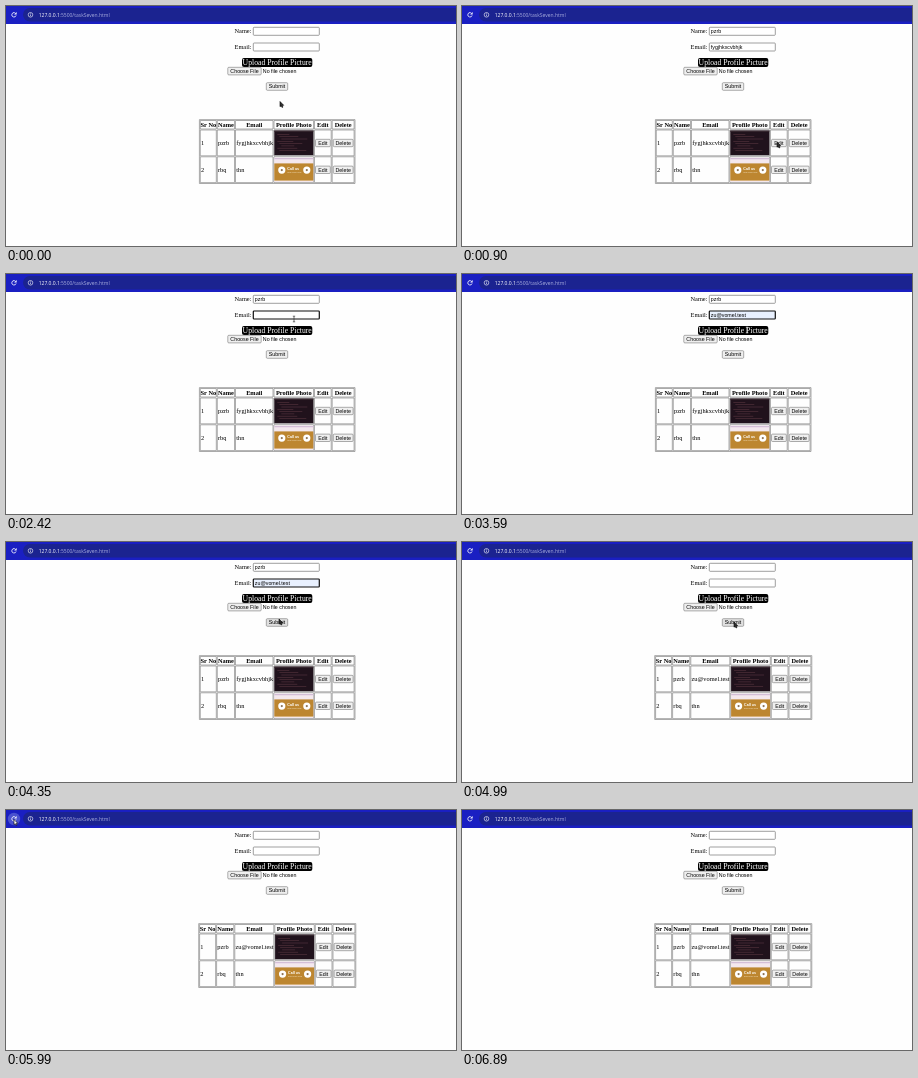
Write an HTML page with a canvas that moves like this. It is 450 px wide and 240 px high and loops after 6.95 s.

```html
<!DOCTYPE html>
<html lang="en">
<head>
<meta charset="utf-8">
<title>Profile table</title>
<style>
  html, body { margin: 0; width: 100%; height: 100%; overflow: hidden; background: #fefefe; }
  canvas { display: block; }
</style>
</head>
<body>
<canvas id="stage" width="450" height="240"></canvas>
<script>
const ctx = document.getElementById('stage').getContext('2d');
const LOOP = 6950;
const SERIF = '"Liberation Serif", serif';
const SANS = '"Liberation Sans", sans-serif';
const NAME = 'pzrb';
const OLD_MAIL = 'fygjhkxcvbhjk';
const NEW_MAIL = 'zu@vomel.test';

// Moments at which the page changes, in ms
const FILL = 900, FOCUS = 1850, SELECT = 2160, CLEAR = 2360, AUTOFILL = 3340, SUBMIT = 4990;

// Pointer path: time, x, y
const PATH = [
  [0, 274, 95.5], [260, 274, 95.5], [380, 285, 108], [580, 285, 108],
  [700, 315, 136], [960, 315, 136], [1330, 289, 48], [1600, 289, 48],
  [1660, 288, 45], [3340, 288, 45], [3590, 285, 56], [3710, 281, 62],
  [3910, 281, 62], [4090, 275, 72], [4290, 275, 72], [4350, 273, 77],
  [4610, 273, 77], [4730, 272, 80], [5250, 272, 80], [5930, 8, 9.5],
  [6110, 8, 9.5], [6410, 348, 118], [6650, 291, 130], [6710, 288, 130]
];

const between = (t, a, b) => t >= a && t < b;

function pointerAt(t) {
  const i = PATH.findIndex(p => p[0] > t);
  if (i < 0) return null;
  const [t0, x0, y0] = PATH[i - 1], [t1, x1, y1] = PATH[i];
  const k = (t - t0) / (t1 - t0), e = k * k * (3 - 2 * k);
  return { x: x0 + (x1 - x0) * e, y: y0 + (y1 - y0) * e };
}

function rect(x, y, w, h, fill) {
  ctx.fillStyle = fill;
  ctx.fillRect(x, y, w, h);
}

function box(x, y, w, h, r, fill, stroke, width = 0.7) {
  ctx.beginPath();
  ctx.roundRect(x, y, w, h, r);
  if (fill) { ctx.fillStyle = fill; ctx.fill(); }
  if (stroke) { ctx.strokeStyle = stroke; ctx.lineWidth = width; ctx.stroke(); }
}

function disc(x, y, r, fill) {
  ctx.beginPath();
  ctx.arc(x, y, r, 0, Math.PI * 2);
  ctx.fillStyle = fill;
  ctx.fill();
}

function text(str, x, y, font, color = '#000', align = 'left') {
  ctx.font = font;
  ctx.fillStyle = color;
  ctx.textAlign = align;
  ctx.fillText(str, x, y);
}

const serif = (str, x, y) => text(str, x, y, `6.35px ${SERIF}`);

function button(label, x, y, w, h, fill = '#efefef') {
  box(x, y, w, h, 1, fill, '#767676', 0.6);
  text(label, x + w / 2, y + h / 2 + 1.9, `5.3px ${SANS}`, '#000', 'center');
}

function input(y, value, { focused, filled, selected } = {}) {
  box(247.3, y, 66, 8, 0.8, filled ? '#e8f0fe' : '#fff',
    focused ? '#101010' : '#767676', focused ? 1.2 : 0.7);
  ctx.font = `5.3px ${SANS}`;
  if (selected) rect(248.8, y + 1, ctx.measureText(value).width, 6, '#1a73e8');
  text(value, 248.8, y + 5.9, `5.3px ${SANS}`, selected ? '#fff' : '#000');
}

function browserBar(t) {
  rect(0, 0, 450, 18, '#1a1fc2');
  box(17, 2, 440, 13.5, 6.7, '#1b2390');
  if (between(t, 5870, 6200)) disc(8, 9, 6.2, '#4a52cf');

  ctx.strokeStyle = '#fff';
  ctx.lineWidth = 0.8;
  ctx.beginPath();
  ctx.arc(8, 8.8, 2.2, 0.3, 5.3);
  ctx.stroke();
  ctx.beginPath();
  ctx.moveTo(10.6, 6);
  ctx.lineTo(10.6, 8.5);
  ctx.lineTo(8.1, 8.5);
  ctx.closePath();
  ctx.fillStyle = '#fff';
  ctx.fill();

  ctx.lineWidth = 0.6;
  ctx.beginPath();
  ctx.arc(24.5, 8.8, 2.3, 0, Math.PI * 2);
  ctx.stroke();
  rect(24.2, 8.4, 0.6, 1.7, '#fff');
  rect(24.2, 7.3, 0.6, 0.6, '#fff');

  const font = '5px "Open Sans", sans-serif';
  text('127.0.0.1', 32.7, 10.8, font, '#fff');
  text(':5500/taskSeven.html', 53.6, 10.8, font, '#a9aede');
}

function mailState(t) {
  if (t < FILL || t >= SUBMIT) return '';
  if (t < CLEAR) return OLD_MAIL;
  if (t >= AUTOFILL) return NEW_MAIL;
  return NEW_MAIL.slice(0, [2620, 2680, 3010].filter(k => t >= k).length);
}

function form(t) {
  serif('Name:', 228.5, 27);
  input(21.3, between(t, FILL, SUBMIT) ? NAME : '');
  serif('Email:', 228.5, 43);
  input(37, mailState(t), {
    focused: between(t, FOCUS, SUBMIT),
    filled: between(t, AUTOFILL, SUBMIT),
    selected: between(t, SELECT, CLEAR)
  });
  box(236, 52, 70.3, 9, 2, '#000');
  text('Upload Profile Picture', 271.2, 59.1, `7.7px ${SERIF}`, '#fff', 'center');
  button('Choose File', 221.8, 61.3, 33.4, 7.6);
  text('No file chosen', 256.8, 67, `5.3px ${SANS}`);
  button('Submit', 260.3, 76.7, 21.4, 7.6, between(t, 4350, 5310) ? '#e0e0e0' : '#efefef');
}

function darkPhoto(x, y) {
  rect(x, y, 39, 24.6, '#20121c');
  rect(x, y, 39, 1.2, '#3a2a32');
  for (let i = 0; i < 8; i++) {
    rect(x + 3 + (i % 3) * 2, y + 3.5 + i * 2.3, 12 + (i * 7) % 17, 0.6, '#56343f');
  }
}

function cardPhoto(x, y) {
  rect(x, y, 39, 24.6, '#f4e8ee');
  rect(x, y + 0.8, 39, 1, '#cdb5d3');
  rect(x, y + 6, 39, 16.6, '#bd8630');
  rect(x, y + 22.6, 39, 1, '#d7b27c');
  for (const dx of [7.5, 32.5]) {
    disc(x + dx, y + 12.7, 3.6, '#fff');
    disc(x + dx, y + 12.7, 1.1, '#8c7152');
  }
  text('Call us', x + 13, y + 12.2, `bold 3.6px ${SANS}`, '#fff');
  text('and order now', x + 13, y + 15.6, `2.2px ${SANS}`, '#f7e8cb');
}

function table(t) {
  const saved = t >= SUBMIT;
  const cols = [193.8, 210.8, 229, 267.5, 308, 325.7, 348.6]
    .map((x, i) => x + (saved ? (i < 3 ? -0.7 : 0.8) : 0));
  const rows = [114, 123.5, 150.3, 177.1];
  const right = cols[6], bottom = rows[3];

  box(cols[0] - 0.4, rows[0] - 0.4, right - cols[0] + 0.8, bottom - rows[0] + 0.8, 0, null, '#777', 0.6);
  for (let r = 0; r < 3; r++) {
    for (let c = 0; c < 6; c++) {
      box(cols[c] + 0.5, rows[r] + 0.5, cols[c + 1] - cols[c] - 1, rows[r + 1] - rows[r] - 1, 0, null, '#777', 0.6);
    }
  }

  ['Sr No', 'Name', 'Email', 'Profile Photo', 'Edit', 'Delete'].forEach((label, c) =>
    text(label, (cols[c] + cols[c + 1]) / 2, 120.8, `bold 6.35px ${SERIF}`, '#000', 'center'));

  const people = [[NAME, saved ? NEW_MAIL : OLD_MAIL, darkPhoto], ['rbq', 'thn', cardPhoto]];
  people.forEach(([name, mail, photo], i) => {
    const top = rows[i + 1], base = top + 15.5;
    [i + 1, name, mail].forEach((value, c) => serif(String(value), cols[c] + 1.2, base));
    photo(cols[3] + 0.8, top + 1.1);
    button('Edit', cols[4] + 1.5, top + 9.8, 14.8, 7.4);
    button('Delete', cols[5] + 1.6, top + 9.8, 19.8, 7.4);
  });
}

function arrow(x, y) {
  const shape = [[0, 0], [0, 5.2], [1.2, 4.2], [2, 6], [2.9, 5.6], [2.1, 3.9], [3.7, 3.8]];
  ctx.beginPath();
  shape.forEach(([dx, dy]) => ctx.lineTo(x + dx, y + dy));
  ctx.closePath();
  ctx.fillStyle = y < 18 ? '#fff' : '#333';
  ctx.fill();
  ctx.strokeStyle = '#000';
  ctx.lineWidth = 0.6;
  ctx.stroke();
}

function textCursor(x, y, color) {
  rect(x - 0.35, y - 3, 0.7, 6, color);
  rect(x - 1.2, y - 3.2, 2.4, 0.6, color);
  rect(x - 1.2, y + 2.6, 2.4, 0.6, color);
}

function pointer(t) {
  const p = pointerAt(t);
  if (!p) return;
  if (between(t, 1270, 3650)) textCursor(p.x, p.y, p.y > 52 ? '#ddd' : '#333');
  else arrow(p.x, p.y);
}

function draw(now) {
  const t = now % LOOP;
  rect(0, 0, 450, 240, '#fefefe');
  browserBar(t);
  form(t);
  table(t);
  pointer(t);
  requestAnimationFrame(draw);
}

const start = performance.now();
draw(0);
function tick() { return performance.now() - start; }
</script>
</body>
</html>
```
